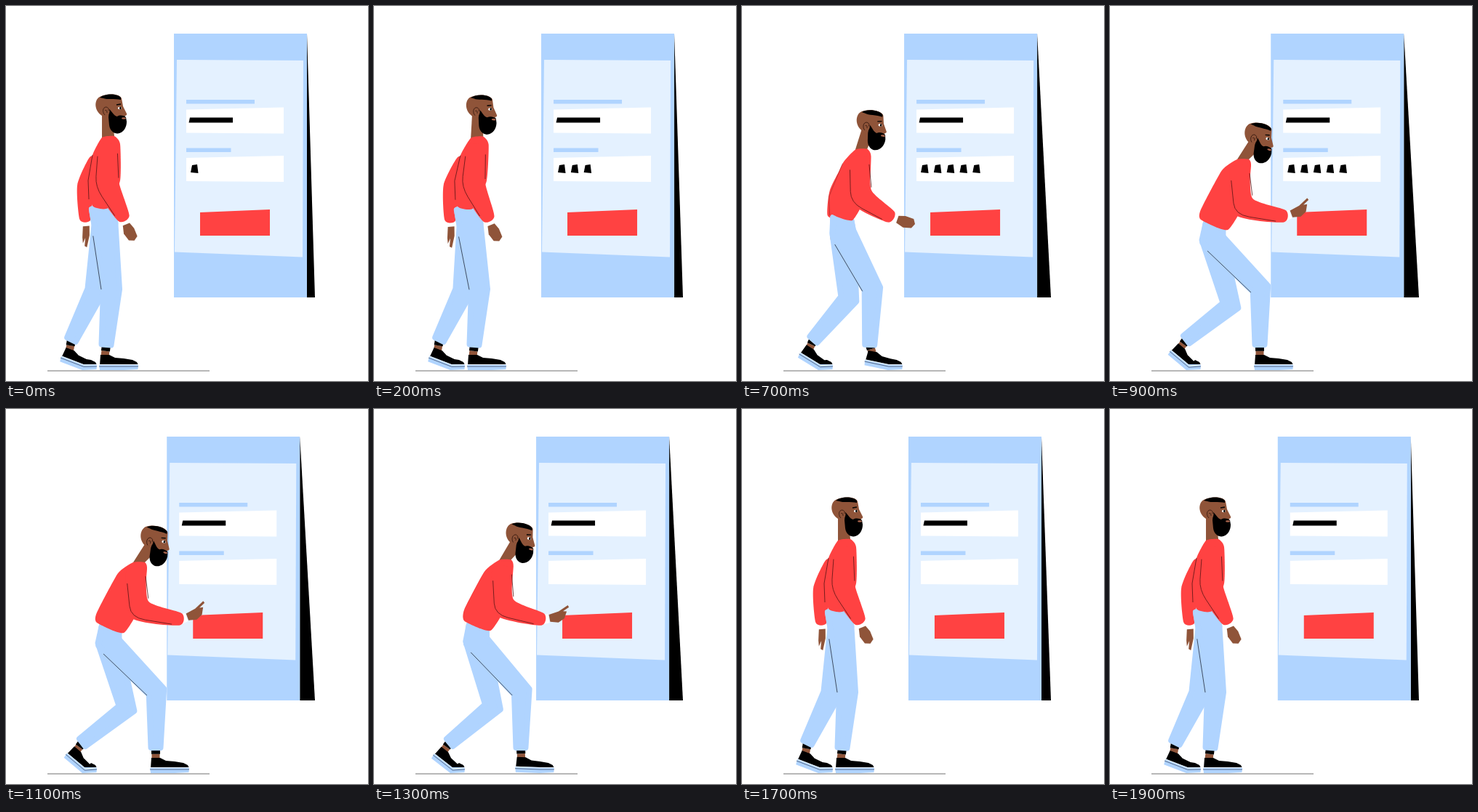
An HTML page with a canvas that plays this animation: 498 by 516 pixels, repeating every 2000 ms.

```html
<!DOCTYPE html>
<html lang="en">
<head>
<meta charset="utf-8">
<title>Signing in</title>
<style>
html, body { margin: 0; width: 100%; height: 100%; overflow: hidden; background: #fff; }
canvas { display: block; }
</style>
</head>
<body>
<canvas id="stage" width="498" height="516"></canvas>
<script>
const ctx = document.getElementById('stage').getContext('2d');
const BLUE = '#b0d4ff', PALE = '#e4f1ff', RED = '#ff4242', SKIN = '#8f5439';
const BLACK = '#000', WHITE = '#fff', FOLD = '#561515';
const LOOP = 2000, STEP = 100, DEG = Math.PI / 180;

const mix = (a, b, u) => a + (b - a) * u;
const between = (p, q, u) => [mix(p[0], q[0], u), mix(p[1], q[1], u)];
const ease = (t, from, to) => {
  const u = Math.min(1, Math.max(0, (t - from) / (to - from)));
  return u * u * (3 - 2 * u);
};

function trace(points) {
  ctx.beginPath();
  points.forEach(p => ctx.lineTo(...p));
}

function poly(color, points, rounding = 0) {
  trace(points);
  ctx.closePath();
  ctx.fillStyle = ctx.strokeStyle = color;
  ctx.fill();
  if (rounding) {
    ctx.lineWidth = rounding;
    ctx.lineJoin = 'round';
    ctx.stroke();
  }
}

function line(color, width, points) {
  trace(points);
  ctx.strokeStyle = color;
  ctx.lineWidth = width;
  ctx.stroke();
}

function shape(color, d, width) {
  const path = new Path2D(d);
  ctx.fillStyle = ctx.strokeStyle = color;
  ctx.lineWidth = width;
  if (width) ctx.stroke(path);
  else ctx.fill(path);
}

function dot(color, x, y, rx, ry) {
  ctx.beginPath();
  ctx.ellipse(x, y, rx, ry, 0, 0, 7);
  ctx.fillStyle = color;
  ctx.fill();
}

// Closed smooth outline through the points
function blob(color, points, tension) {
  const n = points.length, at = i => points[(i + n) % n];
  ctx.beginPath();
  ctx.moveTo(...points[0]);
  for (let i = 0; i < n; i++) {
    const [a, b, c, d] = [at(i - 1), at(i), at(i + 1), at(i + 2)];
    ctx.bezierCurveTo(
      b[0] + (c[0] - a[0]) * tension, b[1] + (c[1] - a[1]) * tension,
      c[0] - (d[0] - b[0]) * tension, c[1] - (d[1] - b[1]) * tension, c[0], c[1]);
  }
  ctx.fillStyle = color;
  ctx.fill();
}

// Both edges of a limb along its joints
function edges(joints, widths) {
  const dir = (p, q) => {
    const len = Math.hypot(q[0] - p[0], q[1] - p[1]);
    return [(q[0] - p[0]) / len, (q[1] - p[1]) / len];
  };
  const side = sign => joints.map(([x, y], i) => {
    const before = dir(joints[Math.max(i - 1, 0)], joints[Math.max(i, 1)]);
    const after = i < joints.length - 1 ? dir(joints[i], joints[i + 1]) : before;
    const dx = before[0] + after[0], dy = before[1] + after[1];
    const k = sign * widths[i] / 2 / Math.hypot(dx, dy);
    return [x - dy * k, y + dx * k];
  });
  return [side(1), side(-1)];
}

function place(x, y, degrees, draw) {
  ctx.save();
  ctx.translate(x, y);
  ctx.rotate(degrees * DEG);
  draw();
  ctx.restore();
}

function drawPhone(t) {
  const dx = -5 * (1 - Math.cos(t / LOOP * 2 * Math.PI));
  poly(BLACK, [[414 + dx, 38], [425, 401], [414 + dx, 401]]);
  place(dx, 0, 0, () => {
    poly(BLUE, [[231, 38], [414, 38], [414, 401], [231, 401]]);
    poly(PALE, [[235, 74], [409, 75], [408, 345.5], [232, 338.5]]);
    [[0, 342], [66.5, 309.5]].forEach(([y, right]) => {
      poly(BLUE, [[248, 129 + y], [right, 129 + y], [right, 134.5 + y], [248, 134.5 + y]]);
      poly(WHITE, [[248, 142.5 + y], [382, 139.5 + y], [382, 175.5 + y], [248, 174.5 + y]]);
    });
    poly(BLACK, [[253, 153.5], [312, 153.5], [312, 160.5], [251.5, 160.5]]);
    poly(RED, [[267, 284], [363, 280], [363, 316], [267, 316]]);
    const typed = t < 1100 ? Math.min(5, 1 + t / STEP) : 0;
    for (let i = 0; i < typed; i++) {
      const x = 254 + i * 17.8;
      poly(BLACK, [[x + 2, 219], [x + 9, 218], [x + 10.5, 230], [x, 229]]);
    }
  });
}

// Hands lie along the x axis, starting at the cuff
const FIST = [[9, -5], [18, -8], [30, -8], [34, -2], [31, 5], [20, 8], [9, 5]];
const POINTING = [[10, -5], [24, -7], [38, -13], [39, -10], [30, -6], [35, -5], [30, 4], [21, 8], [10, 5]];
const LOOSE = [[9, -5], [22, -4], [38, 1], [36, 4], [25, 2], [32, 6], [24, 6], [9, 4]];

function drawArm(joints, widths, angle, hand) {
  place(...joints[2], angle, () => {
    poly(WHITE, [[-2, -7], [9, -6], [9, 6], [-2, 7]]);
    poly(SKIN, hand);
  });
  const [back, front] = edges(joints, widths);
  blob(RED, [...back, ...[...front].reverse()], 0.11);
  return [back, front];
}

function drawLeg(joints) {
  const rounding = 8;
  const [back, front] = edges(joints, [32, 37, 30, 21].map(w => w - rounding));
  poly(BLUE, [...back, ...front.reverse()], rounding);
  return edges(joints, [32, 37, 28, 21])[0];
}

// A shoe whose heel lifts about the ball of the foot, with the ankle above it
function drawShoe(x, bend, ankle) {
  const c = Math.cos(bend * DEG), s = Math.sin(bend * DEG), ball = 34;
  const bent = points => points.map(([px, py]) => {
    const dx = px - ball;
    return dx > 0 ? [x + px, 501 + py] : [x + ball + dx * c - py * s, 501 + dx * s + py * c];
  });
  const [top] = bent([[8, -19]]);
  const middle = between(ankle, top, 0.55);
  line(SKIN, 11, [middle, top]);
  line(BLACK, 12, [ankle, middle]);
  poly(BLACK, bent([[1, -7], [2, -21], [14, -21], [22, -17], [34, -16], [46, -14], [52, -11], [54, -7], [ball, -7]]));
  poly(BLUE, bent([[0, -8], [ball, -8], [ball + 0.1, -8], [54, -8], [53.5, -1], [ball, 0], [1, 0]]));
  line(WHITE, 0.8, bent([[0, -7.5], [ball, -7.5], [54, -7.5]]));
  line('#41506b', 0.8, bent([[0, -5], [ball, -5], [54, -5]]));
}

// The head is drawn around its ear
function drawHead(x, y, tilt, neckBack, neckFront) {
  const c = Math.cos(tilt * DEG), s = Math.sin(tilt * DEG);
  const turn = (px, py) => [x + px * c - py * s, y + px * s + py * c];
  const below = ([px, py]) => [px, py + 6];
  poly(SKIN, [turn(-6, 4), turn(9, 14), neckFront, below(neckFront), below(neckBack), neckBack]);
  place(x, y, tilt, () => {
    shape(SKIN, 'M-6 6C-17 -1 -17 -16 -9 -20C0 -25 18 -25 21 -18L23 -7L28 3Q29 5 26 6L26 13L8 18Z');
    shape(BLACK, 'M-9 -19C-2 -25 15 -25 20 -19L20 -16C12 -18 0 -16 -4 -18Z');
    shape(BLACK, 'M4 -3L3 8L4 19C5 27 11 31 16 30.5C24 29 28 22 28 14L27 8C23 5 18 5 15 7C10 6 8 0 4 -3Z');
    dot('#a9654d', 24, 9.5, 3, 1.3);
    dot(WHITE, 18.5, -4.5, 2.7, 1.8);
    dot(BLACK, 19.3, -4.5, 1.3, 1.7);
    shape(BLACK, 'M14 -9L20 -10', 1.4);
    dot(SKIN, 0, 0, 4.5, 6);
    shape('#3a1c12', 'M-2 5C-6 1 -5 -6 0 -6Q4 -5 3 -1M-2 -1Q1 -3 1 2', 0.9);
  });
}

function drawMan(t) {
  // The stance carries him forward; the reach lowers him and lifts his arm, and ends sooner
  const rise = ease(t, 480, 890);
  const stance = rise - ease(t, 1240, 1645);
  const reach = rise - ease(t, 1235, 1555);
  const lean = ease(t, 0, 500) - ease(t, 500, 700);

  // Leaning pushes the head forward and the hips back, with the knees fixed
  const sway = y => lean * (y < 285 ? mix(9, -13, (y - 145) / 140) : mix(-13, 0, Math.min(1, (y - 285) / 105)));
  // Each joint has a place when standing and one when pressing
  const joint = (x, y, pressX, pressY, forward = stance) =>
    [mix(x, pressX, forward) + sway(y), mix(y, pressY, reach) + (y < 320 ? 2 * lean : 0)];

  const neckBack = joint(132, 181, 175, 211), neckFront = joint(149, 179, 191, 211);
  const waistFront = joint(140, 278, 162, 308), waistBack = joint(119, 275, 125, 294);
  const lowBack = joint(113, 240, 125, 280), upperBack = joint(119, 205, 154, 226);
  const hip = joint(136, 300, 141, 321);
  const kneeFront = joint(145, 390, 207, 389), ankleFront = joint(138, 466, 206, 466);
  const kneeBack = joint(123, 392, 166, 412), ankleBack = joint(90, 459, 105, 459);
  const waist = between(waistFront, waistBack, 0.5);

  const farArm = [joint(122, 210, 162, 236), joint(109, 248, 149, 265), joint(109, 294, 138, 286)];
  drawArm(farArm, [14, 22, 15], 85, LOOSE);

  drawShoe(71, mix(21, 40, reach), ankleBack);
  drawShoe(mix(128, 198, stance), 12 * Math.sin(Math.PI * stance), ankleFront);
  drawLeg([waist, hip, kneeBack, ankleBack]);
  const seam = drawLeg([waist, hip, kneeFront, ankleFront]);
  line('#222b3a', 0.8, [between(seam[1], seam[2], 0.15), seam[2]]);

  drawHead(...joint(138, 145, 198, 183), 13 * reach + 7 * lean, neckBack, neckFront);
  const chest = joint(157, 190, 194, 220), belly = joint(157, 240, 188, 265);
  blob(RED, [neckBack, neckFront, chest, belly, waistFront, waistBack, lowBack, upperBack], 0.09);
  ctx.globalAlpha = 1 - stance;
  line(FOLD, 0.8, [upperBack, lowBack, [lowBack[0] + 1, lowBack[1] + 26]]);
  ctx.globalAlpha = 1;

  const nearArm = [joint(140, 193, 178, 223), joint(139, 245, 184, 276, reach), joint(162, 292, 240, 289.5, reach)];
  const hand = t >= 800 && t < 1500 ? POINTING : FIST;
  const [back, front] = drawArm(nearArm, [26, 33, 17], mix(68, -20, reach), hand);
  ctx.beginPath();
  ctx.moveTo(...between(back[0], back[1], 0.25));
  ctx.lineTo(...between(back[0], back[1], 0.75));
  ctx.quadraticCurveTo(...back[1], ...between(back[1], back[2], 0.3));
  ctx.lineTo(...between(back[1], back[2], 0.85));
  ctx.strokeStyle = FOLD;
  ctx.lineWidth = 0.8;
  ctx.stroke();
  line(FOLD, 0.8, [between(front[0], front[1], 0.2), between(front[0], front[1], 0.9)]);
}

function frame(now) {
  const t = Math.floor(now % LOOP / STEP) * STEP;
  ctx.fillStyle = WHITE;
  ctx.fillRect(0, 0, 498, 516);
  drawPhone(t);
  line('#707070', 1, [[57, 502], [280, 502]]);
  drawMan(t);
  requestAnimationFrame(() => frame(performance.now()));
}

frame(0);
</script>
</body>
</html>
```
